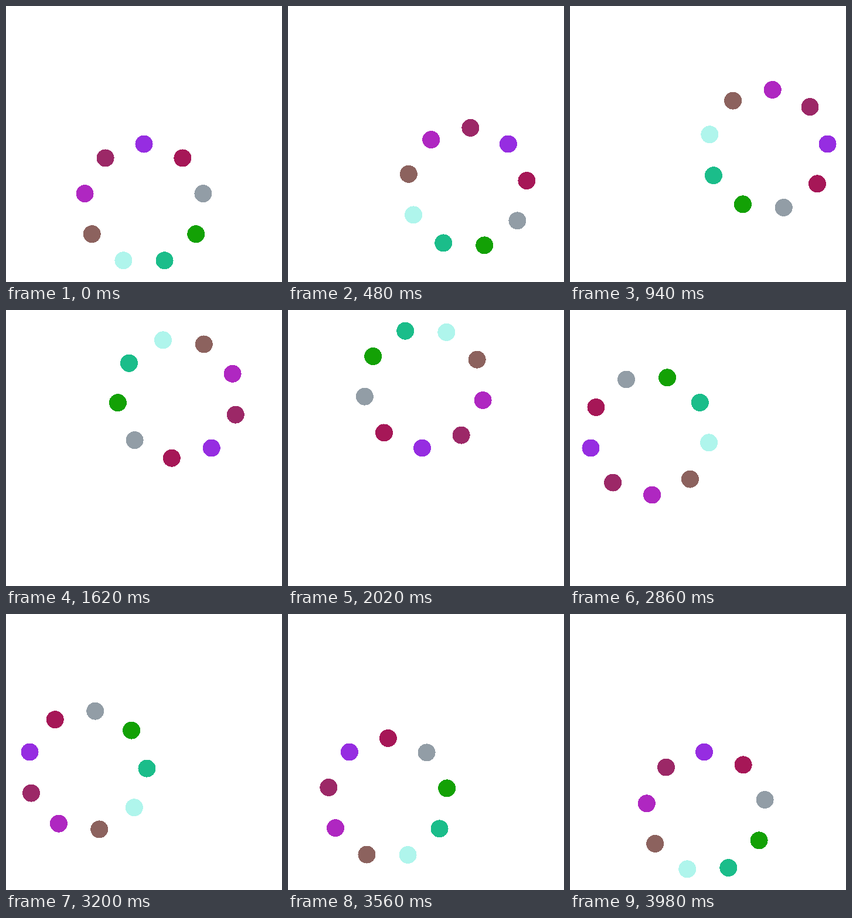
Recreate the animation shown at these times as an HTML page. Size 471 by 471 pixels, loop 4000 ms.

```html
<!DOCTYPE html>
<html lang="en">
<head>
<meta charset="utf-8">
<title>Rolling ring</title>
<style>
  html, body { margin: 0; width: 100%; height: 100%; overflow: hidden; background: #fff; }
  svg { display: block; width: 100%; height: 100%; }
</style>
</head>
<body>
<svg viewBox="0 0 471 471" shape-rendering="crispEdges"></svg>
<script>
  const COLORS = ['#962de1', '#a61757', '#929da6', '#13a105', '#1bbd8a',
                  '#aff5ec', '#8c625e', '#af27c1', '#9c2867'];
  const LOOP = 4000, STEP = 20, MID = 235.5, RING = 102.5;
  const svg = document.querySelector('svg');

  const dots = COLORS.map(color => {
    const dot = document.createElementNS('http://www.w3.org/2000/svg', 'circle');
    dot.setAttribute('r', 15);
    dot.setAttribute('fill', color);
    return svg.appendChild(dot);
  });

  // The ring orbits the middle one way while spinning the other way,
  // so every dot slides along a straight line.
  function draw(time) {
    const angle = Math.floor(time % LOOP / STEP) * STEP / LOOP * 2 * Math.PI;
    dots.forEach((dot, i) => {
      const spin = angle + i * 2 * Math.PI / dots.length;
      dot.setAttribute('cx', MID + RING * (Math.sin(angle) + Math.sin(spin)));
      dot.setAttribute('cy', MID + RING * (Math.cos(angle) - Math.cos(spin)));
    });
  }

  const start = performance.now();
  function tick() {
    draw(performance.now() - start);
    requestAnimationFrame(tick);
  }
  tick();
</script>
</body>
</html>
```
